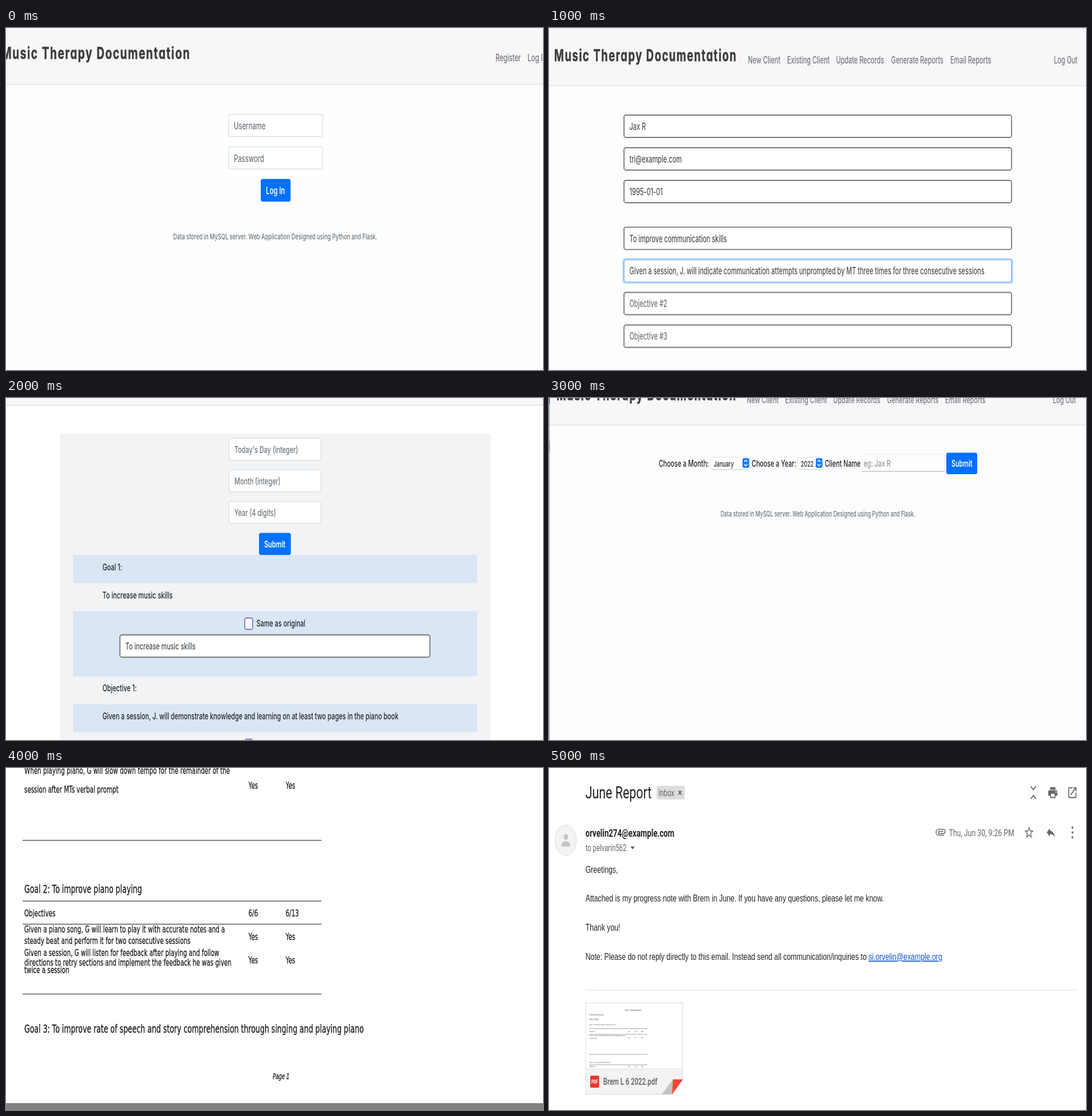
An HTML page that plays this animation: 938 by 597 pixels, repeating every 6000 ms.

```html
<!DOCTYPE html>
<html lang="en">
<head>
<meta charset="utf-8">
<title>Music Therapy Documentation</title>
<style>
  html, body { margin: 0; width: 100%; height: 100%; overflow: hidden; background: #fff; }
  svg { position: absolute; left: 0; top: 0; display: block; }
  text { font-feature-settings: "calt" 0; }
  .title { font-weight: 700; letter-spacing: .09em; font-feature-settings: "cv11"; stroke: #3d3d3b; stroke-width: .6; stroke-linejoin: round; }
</style>
</head>
<body>
<script>
const W = 938, H = 597;
const INK = '#212529', MUTED = '#6c757d', FIELD = '#495057', BLUE = '#0070ff';
const UI = 'Inter, sans-serif', DOC = "'DejaVu Sans', sans-serif";
const MAIL = 'Roboto, sans-serif', BODY = "'Liberation Sans', Arial, sans-serif";

// Each screen is a narrowed capture; y is the middle of the capitals.
const pen = (family, squeeze, look = '') => (str, x, y, size, fill = INK, extra = look) =>
  `<text transform="translate(${x} ${y + size * .364}) scale(${squeeze} 1)" font-family="${family}" font-size="${size}" fill="${fill}" ${extra}>${str}</text>`;
const uiPen = squeeze => pen(UI, squeeze, 'font-weight="500"');
const rect = (x, y, w, h, fill, extra = '') =>
  `<rect x="${x}" y="${y}" width="${w}" height="${h}" fill="${fill}" ${extra}/>`;
const path = (d, fill, extra = '') => `<path d="${d}" fill="${fill}" ${extra}/>`;
const stroke = (d, color, width = 1.5) => path(d, 'none', `stroke="${color}" stroke-width="${width}"`);
const hline = (x1, x2, y, color, width) => stroke(`M${x1} ${y}H${x2}`, color, width);
const box = (x, y, w, h, color, width = 1, fill = '#fff') =>
  rect(x, y, w, h, fill, `rx="3.5" stroke="${color}" stroke-width="${width}"`);

function header(text, bottom, base, titleX, titleY, navY, links) {
  return rect(0, 0, W, bottom, '#f6f7f9') + hline(0, W, bottom, '#e2e4e7', 1.5) +
    text('Music Therapy Documentation', titleX, titleY, base * 1.67, '#3d3d3b', 'class="title"') +
    links.map(([label, x]) => text(label, x, navY, base, '#74777b')).join('');
}
const menu = xs => ['New Client', 'Existing Client', 'Update Records', 'Generate Reports', 'Email Reports', 'Log Out']
  .map((label, i) => [label, xs[i]]);
const button = (text, label, x, y, w, h, size) =>
  rect(x, y, w, h, BLUE, 'rx="3.5"') + text(label, x + 9, y + h / 2 + .3, size, '#fff', 'font-weight="600"');
const CREDIT = 'Data stored in MySQL server. Web Application Designed using Python and Flask.';

function login() {
  const text = uiPen(.672), size = 16.8;
  const field = (label, y) => box(388.8, y, 164.4, 39, '#d0d4d9') + text(label, 398, y + 20.3, size, MUTED);
  return rect(0, 0, W, H, '#fefefe') +
    header(text, 98.5, size, -8, 44, 51.7, [['Register', 855], ['Log In', 911]]) +
    field('Username', 150.5) + field('Password', 207.2) +
    button(text, 'Log In', 445, 263.5, 52, 39.5, size) +
    text(CREDIT, 292, 363.5, 13.8, MUTED);
}

function newClient() {
  const text = uiPen(.65), size = 16.8;
  const field = (label, y, color = FIELD) => box(131, y, 677, 39, '#76787c', 1.8) + text(label, 140.5, y + 19.8, size, color);
  const focusY = 404.5;
  return rect(0, 0, W, H, '#fcfdff') +
    header(text, 101, size, 9, 48, 55.7, menu([347.5, 416, 501.5, 597.5, 701, 882])) +
    hline(0, W, .5, '#dcdee0', 1) +
    field('Jax R', 152) + field('tri@example.com', 209) + field('1995-01-01', 266) +
    field('To improve communication skills', 347.7) +
    box(130, focusY - 1, 679, 41, '#c3e0ff', 4) + box(131, focusY, 677, 39, '#74b6fb', 1.6) +
    text('Given a session, J. will indicate communication attempts unprompted by MT three times for three consecutive sessions', 140.5, focusY + 19.8, size, FIELD) +
    field('Objective #2', 461.5, MUTED) + field('Objective #3', 518.5, MUTED);
}

function updateRecords() {
  const text = uiPen(.661), size = 16.4;
  const field = (label, y) => box(389.5, y, 160.5, 38, '#d0d4d9') + text(label, 399, y + 19.8, size, MUTED);
  const band = (y, h) => rect(117, y, 706, h, '#dbe6f4');
  const check = y => box(417, y - 9, 14, 20, '#575ba8', 1.3, '#f4f6fb') + text('Same as original', 437.5, y, size);
  const line = (label, y) => text(label, 168.5, y, size);
  return rect(0, 0, W, H, '#fff') + rect(0, 0, W, 12.5, '#f6f7f9') + hline(0, W, 12.7, '#e0e2e5', 1.5) +
    rect(94, 62.5, 752.5, H, '#f1f3f5') +
    field("Today's Day (integer)", 70.5) + field('Month (integer)', 125.6) + field('Year (4 digits)', 180.7) +
    band(274, 49) + band(372, 114) + band(534.5, 49) +
    button(text, 'Submit', 442, 235.5, 55.5, 38.5, size) +
    line('Goal 1:', 295) + line('To increase music skills', 343.7) + check(393) +
    box(199, 413.5, 541.5, 39, '#74777b', 1.8) + text('To increase music skills', 208.5, 433.3, size, FIELD) +
    line('Objective 1:', 506.5) +
    line('Given a session, J. will demonstrate knowledge and learning on at least two pages in the piano book', 555.5) +
    check(604.5);
}

function generateReports() {
  const text = uiPen(.66), size = 16.3, midY = 114.3;
  const select = (value, x, w) => box(x, 103.5, w, 21, '#e3e5e8') + hline(x + 2, x + w - 2, 125, '#cfd1d4', 1) +
    text(value, x + 5.7, 115, 13.6, INK) + rect(x + w - 12, 105, 11.5, 17, '#117bff', 'rx="3"') +
    stroke(`M${x + w - 9} 111.5l2.7 -3.2l2.7 3.2m0 4l-2.7 3.2l-2.7 -3.2`, '#fff', 1.4);
  return rect(0, 0, W, H, '#fcfdff') +
    header(text, 47, size, 13, -5.5, 2.7, menu([345.5, 412.5, 496.5, 590.5, 692, 880])) +
    rect(0, 0, 1.4, H, '#b4b6ba') + rect(0, 0, 1.4, 10, '#3c66b0') + rect(0, 75, 1.2, 18, '#77797d') +
    text('Choose a Month:', 191.7, midY, size) + select('January', 282, 68) +
    text('Choose a Year:', 354, midY, size) + select('2022', 434, 44) +
    text('Client Name', 481.7, midY, size) +
    rect(547.5, 98.5, 143, 29.5, '#fefefe', 'stroke="#eceef0"') + hline(547, 691, 128, '#c4c6c9', 1.3) +
    text('eg: Jax R', 549.5, midY, size, '#94989c') +
    button(text, 'Submit', 694, 95.5, 54, 37.5, size) +
    text(CREDIT, 299.7, 202, 13.4, MUTED);
}

function reportPage() {
  const ink = '#161616', small = 16.5, large = 20, bolder = `stroke="${ink}" stroke-width=".3"`;
  const text = pen(DOC, .626, bolder);
  const line = (label, y, size = small) => text(label, 32, y, size, ink);
  const cells = (a, b, y) => text(a, 423.5, y, small, ink) + text(b, 488.5, y, small, ink);
  return rect(0, 0, W, H, '#fff') +
    line('When playing piano, G will slow down tempo for the remainder of the', 4) +
    line('session after MTs verbal prompt', 37) + cells('Yes', 'Yes', 29.5) +
    line('Goal 2: To improve piano playing', 211, large) +
    line('Objectives', 253) + cells('6/6', '6/13', 253) +
    line('Given a piano song, G will learn to play it with accurate notes and a', 281) +
    line('steady beat and perform it for two consecutive sessions', 301) + cells('Yes', 'Yes', 294) +
    line('Given a session, G will listen for feedback after playing and follow', 321.5) +
    line('directions to retry sections and implement the feedback he was given', 338.5) +
    line('twice a session', 351.5) + cells('Yes', 'Yes', 334.5) +
    [126.4, 232.4, 272.6, 394.6].map(y => hline(29, 551, y, '#707070', 1.7)).join('') +
    line('Goal 3: To improve rate of speech and story comprehension through singing and playing piano', 455, large) +
    text('Page 1', 466, 538.5, 13.6, ink, `font-style="italic" ${bolder}`) +
    rect(0, 585, W, 12, '#828282');
}

function thumbnail() {
  const text = pen(DOC, .7);
  const tiny = (label, x, y, size = 2.7) => text(label, x, y, size, '#333');
  const columns = (labels, y) => labels.map((label, i) => tiny(label, 138 + i * 11.5, y)).join('');
  return rect(64, 410, 169.5, 159.5, '#fff', 'stroke="#dcdcdc"') +
    tiny('Music Therapy Report', 133, 423, 3.7) + tiny('Client Name: Brem L', 70.5, 431, 3.6) + tiny('Date: 6/2022', 70.5, 439, 3.6) +
    tiny('Goal 1: To develop therapeutic rapport and trust', 70.5, 448.5) +
    tiny('Objectives', 70.5, 460.5) + columns(['6/6', '6/13', '6/27'], 460.5) +
    tiny('Given a session, client will identify and choose a suggested song', 70.5, 467) +
    tiny('consecutively', 70.5, 472.5) + columns(['Yes', 'Yes', 'Yes'], 471.5) +
    tiny('Goal 2: To increase artistic expression', 70.5, 514) +
    tiny('Objectives', 70.5, 521.5) + columns(['6/6', '6/13', '6/27'], 521.5) +
    [455, 465, 500, 518].map(y => hline(70, 172, y, '#999', .9)).join('') +
    rect(64.5, 525, 168.5, 44, '#f3f3f3') + hline(64, 234, 525, '#e2e2e2', 1) +
    path('M234.5 543V571H215Z', '#fff') + path('M197 570L217 543L216 570Z', '#c2c2c2') + path('M216.5 543.5H234L215 569.5Z', '#f44336');
}

function email() {
  const squeeze = .723, GREY = '#666';
  const text = pen(MAIL, squeeze), body = pen(BODY, squeeze);
  const line = (label, y) => body(label, 63.7, y, 17, '#222');
  const icon = (d, x, y) => path(d, GREY, `fill-rule="evenodd" transform="translate(${x} ${y}) scale(.79 1.06) translate(-12 -12)"`);
  return rect(0, 0, W, H, '#fff') +
    text('June Report', 63.7, 42.7, 29.6, '#222') +
    rect(188, 31, 49, 24, '#dddddd', 'rx="3.5"') + text('Inbox', 191.2, 43, 15.7, '#666') +
    stroke('M226 39.5l5.5 7m0 -7l-5.5 7', '#555', 1.5) +
    stroke('M841.5 32l4.5 6l4.5 -6M841.5 54l4.5 -6l4.5 6', GREY, 1.7) +
    icon('M19 8H5Q2 8 2 11V17H6V21H18V17H22V11Q22 8 19 8ZM16 19H8V14H16ZM18 10H20V12H18ZM18 3H6V7H18Z', 880, 43) +
    icon('M19 19H5V5H12V3H5Q3 3 3 5V19Q3 21 5 21H19Q21 21 21 19V12H19ZM14 3V5H17.6L7.8 14.8L9.2 16.2L19 6.4V10H21V3Z', 914.2, 43) +
    '<ellipse cx="29.2" cy="126" rx="18.6" ry="26.4" fill="#f3f3f3" stroke="#dcdcdc"/><ellipse cx="29.4" cy="120.3" rx="3.9" ry="5.3" fill="#c6c6c6"/>' +
    path('M22 137V133.5C22 126.5 36.8 126.5 36.8 133.5V137Z', '#c6c6c6') +
    text('orvelin274@example.com', 63.7, 113, 18.3, '#222', 'font-weight="700"') +
    text('to pelvarin562', 63.7, 139.3, 15.7, GREY) + path('M142 137H150L146 142Z', GREY) +
    stroke('M690 117.3H681C674.5 117.3 674.5 107 681 107H688.5C693 107 693 114.5 688.5 114.5H682C679.6 114.5 679.6 110.5 682 110.5H689', GREY, 1.5) +
    text('Thu, Jun 30, 9:26 PM', 698.5, 112.5, 17, GREY) +
    icon('M22 9.2L14.8 8.6L12 2L9.2 8.6L2 9.2L7.5 14L5.8 21L12 17.3L18.2 21L16.5 14ZM12 15.4L8.2 17.7L9.2 13.4L5.9 10.5L10.3 10.1L12 6.1L13.7 10.1L18.1 10.5L14.8 13.4L15.8 17.7Z', 838.5, 112.5) +
    icon('M10 9V5L3 12L10 19V14.9C15 14.9 18.5 16.5 21 20C20 15 17 10 10 9Z', 876.5, 112.5) +
    [104, 112.5, 121].map(y => `<ellipse cx="914.3" cy="${y}" rx="1.6" ry="2.1" fill="${GREY}"/>`).join('') +
    line('Greetings,', 176.5) +
    line('Attached is my progress note with Brem in June. If you have any questions, please let me know.', 227.3) +
    line('Thank you!', 278.3) +
    line('Note: Please do not reply directly to this email. Instead send all communication/inquiries to <tspan fill="#1155cc" text-decoration="underline">si.orvelin@example.org</tspan>', 329) +
    hline(63.5, 924, 387.5, '#dcdcdc', 1.2) + thumbnail() +
    rect(72, 537, 15.5, 21, '#e8392f', 'rx="2"') + text('PDF', 74, 547.7, 8.5, '#fff', 'font-weight="700"') +
    text('Brem L 6 2022.pdf', 94.7, 547.5, 15.7, '#707070', 'font-weight="700"');
}

const HOLD = 1000;
const screens = [login, newClient, updateRecords, generateReports, reportPage, email];
document.body.innerHTML = screens.map(draw =>
  `<svg width="${W}" height="${H}" viewBox="0 0 ${W} ${H}">${draw()}</svg>`).join('');
const layers = [...document.querySelectorAll('svg')];

function show() {
  const current = Math.floor(performance.now() / HOLD) % layers.length;
  layers.forEach((layer, i) => { layer.style.visibility = i === current ? 'visible' : 'hidden'; });
  requestAnimationFrame(show);
}
show();
</script>
</body>
</html>
```
